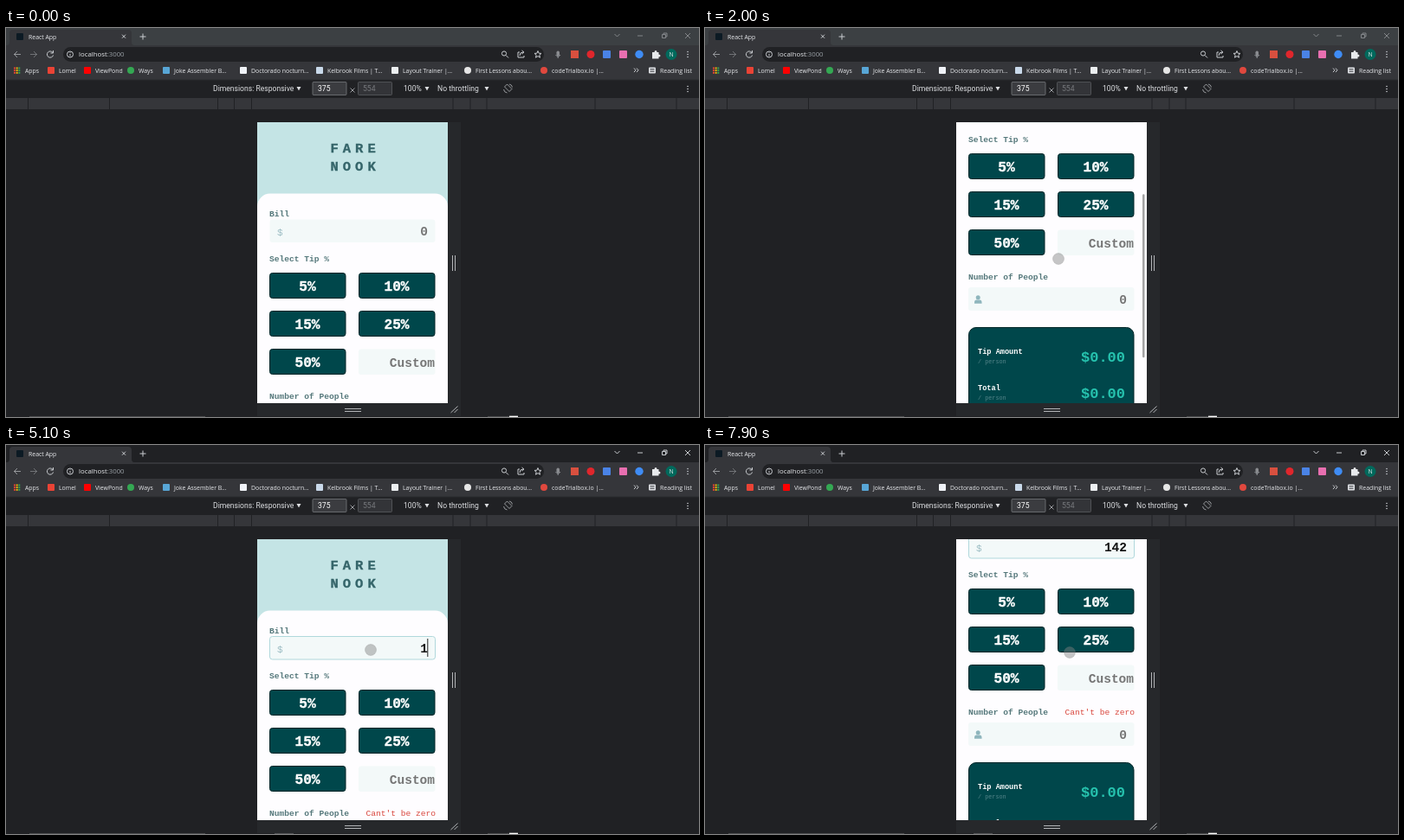
An HTML page that plays this animation: 800x450 px, repeating every 8000 ms.

```html
<!DOCTYPE html>
<html lang="en">
<head>
<meta charset="utf-8">
<title>Tip calculator</title>
<style>
html, body { margin: 0; width: 100%; height: 100%; overflow: hidden; background: #202124; }
svg { display: block; }
text { white-space: pre; }
.ui { font-family: "Open Sans", "Noto Sans", sans-serif; font-size: 6.9px; fill: #e8eaed; }
.dev { font-family: Roboto, "Liberation Sans", sans-serif; font-size: 8.6px; fill: #dcdee1; }
.page { font-family: "Liberation Mono", "DejaVu Sans Mono", monospace; font-weight: bold; }
.line { fill: none; stroke: #c9ccd0; stroke-width: 1; }
</style>
</head>
<body>
<svg id="stage" width="800" height="450" viewBox="0 0 800 450"></svg>
<script>
const stage = document.getElementById('stage');
const LOOP = 8000;

const rect = (x, y, w, h, fill, r = 0, extra = '') =>
  `<rect x="${x}" y="${y}" width="${w}" height="${h}" rx="${r}" fill="${fill}" ${extra}/>`;
const dot = (x, y, r, fill, extra = '') =>
  `<circle cx="${x}" cy="${y}" r="${r}" fill="${fill}" ${extra}/>`;
const path = (d, extra = '') => `<path class="line" d="${d}" ${extra}/>`;
const text = (x, y, s, extra = '') => `<text x="${x}" y="${y}" ${extra}>${s}</text>`;
const mono = (x, y, s, size, fill, anchor = 'start', extra = '') =>
  text(x, y, s, `font-size="${size}" fill="${fill}" text-anchor="${anchor}" ${extra}`);
const arrow = x => `<path d="M${x - 2.5} 68h5l-2.5 4.5z" fill="#dcdee1"/>`;
const dots = (x, y) => [-3, 0, 3].map(d => dot(x, y + d, .8, '#c9ccd0')).join('');

function browser() {
  const bar = '#35363a';
  let s = rect(0, 0, 800, 450, '#202124')
    + rect(0, 0, 800, 20, '#202124', 0, 'id="frame"') + rect(0, 20, 800, 40, bar)
    + `<path d="M1 20q3 0 3-4V6q0-4 4-4h133q4 0 4 4v10q0 4 3 4z" fill="${bar}"/>`
    + rect(12, 6, 8, 8, '#0c1a24', 1)
    + text(26, 12.5, 'React App')
    + path('M134 7.7l4 4m0-4l-4 4M154.500 10h7m-3.500-3.500v7')
    + `<g id="controls">${path('M702.500 7l3 3 3-3', 'stroke-width=".8"')}`
    + path('M729 9h6M757.500 7.500h4v4h-4zM759 7.500v-1.500h4v4h-1.500M784 6l6 6m0-6l-6 6') + '</g>'

    // address row
    + rect(66, 22, 555, 17, '#202124', 8.5)
    + path('M17 30.500H9.500m3.500-3.500l-3.500 3.500 3.500 3.500', 'opacity=".65"')
    + path('M28 30.500h7.500m-3.500-3.500l3.500 3.500-3.500 3.500', 'opacity=".4"')
    + path('M54 28.500a3.600 3.600 0 1 0 .5 3M54.500 26v3h-3', 'stroke-width="1.200"')
    + dot(74, 30.5, 3.5, 'none', 'class="line"') + path('M74 30v2.500M74 28.300v.8')
    + text(84, 33.3, 'localhost<tspan fill="#9aa0a6">:3000</tspan>', 'style="font-size:7.800px"')
    + dot(575, 29.5, 2.6, 'none', 'class="line"') + path('M577 31.500l3 3')
    + path('M593 28h-2v6h7v-2M593 32q0-4 4-4m-1.500-2l2.500 2-2.500 2', 'stroke-width=".9"')
    + path('M614 26.500l1.100 2.700 2.900.2-2.200 1.900.7 2.900-2.500-1.600-2.500 1.600.7-2.900-2.200-1.900 2.900-.2z', 'stroke-width=".8"')
    + rect(635.5, 26.5, 3.5, 6, '#8a8c90', 1.7) + path('M634.500 31q2.700 4 5.500 0M637.200 33v2', 'opacity=".6"')
    + rect(652, 26, 9, 9, '#d8503f') + dot(675, 30.5, 4.5, '#e0262c')
    + rect(689, 26, 9, 9, '#4a83e6', 1) + rect(708, 26, 9, 9, '#e86fb0', 1)
    + dot(731, 30.5, 4.7, '#3f8cf5')
    + '<path d="M746 28h2.500q0-2 1.500-2t1.500 2h2v2.500q2 0 2 1.500t-2 1.500v2h-7.500z" fill="#e8eaed"/>'
    + dot(768, 30.5, 6.5, '#00695c') + text(768, 33, 'N', 'text-anchor="middle"')
    + dots(787, 30.5);

  // bookmarks: icon x, icon colour, round, label
  const marks = [
    [52, '#ea4335', 0, 'Lomel'], [94, '#f00', 0, 'ViewPond'], [144, '#34a853', 1, 'Ways'],
    [185, '#58a6d6', 0, 'Joke Assembler B...'], [274, '#f0f3f8', 0, 'Doctorado nocturn...'],
    [362, '#c9d9ea', 0, 'Kelbrook Films | T...'], [449, '#eceff1', 0, 'Layout Trainer |...'],
    [533, '#e6e6e6', 1, 'First Lessons abou...'], [621, '#e0483e', 1, 'codeTrialbox.io |...']
  ];
  const hues = ['#ea4335', '#fbbc04', '#34a853', '#4285f4'];
  for (let i = 0; i < 9; i++)
    s += rect(9 + i % 3 * 2.7, 45.5 + (i / 3 | 0) * 2.7, 1.9, 1.9, hues[(i + (i / 3 | 0)) % 4]);
  s += text(22, 51.5, 'Apps');
  for (const [x, c, round, label] of marks)
    s += (round ? dot(x, 49, 4, c) : rect(x - 4, 45, 8, 8, c, 1)) + text(x + 9, 51.5, label);
  s += path('M725 46.500l2 2.300-2 2.300m3-4.600l2 2.300-2 2.300')
    + rect(742, 45.5, 8, 7, '#dfe1e5', 1) + path('M743.500 47.800h5m-5 2.400h5', 'style="stroke:#35363a"')
    + text(755, 51.5, 'Reading list');
  return `<g class="ui">${s}</g>`;
}

function devtools() {
  let s = rect(0, 59.5, 800, 1, '#2b2c2f')
    + text(239, 73, 'Dimensions: Responsive') + arrow(338)
    + rect(354, 62.5, 39, 15, '#3b3c40', 1, 'stroke="#77797d" stroke-width=".8"') + text(360, 73, '375', 'fill="#fff"')
    + path('M397.500 69.500l5 5m0-5l-5 5', 'stroke-width=".8" opacity=".7"')
    + rect(406.5, 62.5, 39, 15, '#333438', 1, 'stroke="#5b5d61" stroke-width=".8"') + text(412, 73, '554', 'style="fill:#77797d"')
    + text(459, 73, '100%') + arrow(486)
    + text(498, 73, 'No throttling') + arrow(555)
    + path('M575.500 68l3-3 5.500 5.500-3 3zM574.500 71q.5 3.500 4 4M581 65q3 .5 3.500 3.500', 'stroke-width=".8" opacity=".7"')
    + dots(787, 70.5)
    + rect(0, 81, 800, 13, '#35363a');
  for (const x of [25.5, 119.5, 244.5, 263.5, 283.5])
    s += path(`M${x} 81v13M${799.5 - x} 81v13`, 'style="stroke:#202124"');
  s += rect(290, 109, 235, 340, '#26282b')
    + path('M515.500 263v18m3-18v18M391 440.500h19m-19 3h19', 'style="stroke:#b4b6b9"')
    + path('M513.500 445l8-7.500m-4 7.500l4-4', 'style="stroke:#b4b6b9"')
    + rect(27, 449, 203, 1, '#4a4b4d') + rect(556, 449, 25, 1, '#47484a') + rect(581, 448.7, 10, 1.3, '#fff')
    + rect(310, 449, 22, 1, '#505154', 0, 'id="task"');
  return `<g class="dev">${s}</g>`;
}

function page() {
  const dark = '#00474b', label = '#55787b', field = '#f3f9f9', hint = '#757575', edge = 'stroke="#002427"';
  const heavy = c => `stroke="${c}" stroke-width=".35"`;
  const button = (x, y, s) =>
    rect(x + .5, y, 87.5, 29, dark, 3, edge) + mono(x + 44, y + 20.5, s, 16.1, '#fff', 'middle', heavy('#fff'));
  const amount = (y, name) => mono(315, y, name, 8.6, '#fff')
    + mono(315, y + 10.3, '/ person', 6.8, '#55858a', 'start', 'font-weight="normal"')
    + mono(485, y + 8.5, '$0.00', 17, '#26c2ae', 'end');
  const title = (y, s) => mono(374.5, y, s, 15.5, '#35656a', 'start', `letter-spacing="5" ${heavy('#35656a')}`);

  return rect(290, 100, 220, 600, '#c4e4e5') + title(144, 'FARE') + title(164.5, 'NOOK')
    + rect(290, 191.5, 220, 451.5, '#fefdff', 15)
    + mono(304, 217.5, 'Bill', 9.6, label)
    + rect(304.5, 221.5, 191, 26.5, field, 3, 'id="bill"')
    + mono(313, 239.5, '$', 11, '#9bbcc3', 'start', 'font-weight="normal"')
    + mono(487, 240, '0', 14.5, hint, 'end', 'id="value"')
    + rect(486.3, 224, 1, 21, '#222', 0, 'id="caret"')
    + mono(304, 270, 'Select Tip %', 9.6, label)
    + button(304, 283.5, '5%') + button(407, 283.5, '10%')
    + button(304, 327.5, '15%') + button(407, 327.5, '25%') + button(304, 371.5, '50%')
    + rect(407, 371.5, 88.5, 29.5, field, 3) + mono(495, 391.7, 'Custom', 14.5, hint, 'end')
    + mono(304, 429, 'Number of People', 9.6, label)
    + mono(496, 429, "Cant't be zero", 9.6, '#d9483f', 'end', 'id="error" font-weight="normal"')
    + rect(304, 438, 191.5, 27, field, 3)
    + dot(315.2, 449.7, 2.5, '#8fb6bd')
    + '<path d="M311 456.800v-1.300q0-3 2.500-3h3.500q2.500 0 2.500 3v1.300z" fill="#8fb6bd"/>'
    + mono(487, 457, '0', 14.5, hint, 'end')
    + rect(304.5, 484.5, 190.5, 143.5, dark, 8.5, edge)
    + amount(515.3, 'Tip Amount') + amount(557.3, 'Total')
    + rect(315, 589, 170, 26.5, '#07565b', 3)
    + mono(400, 606.3, 'RESET', 10.3, '#00393d', 'middle', 'letter-spacing=".7"');
}

stage.innerHTML = browser() + devtools()
  + `<svg class="page" x="290" y="109" width="220" height="325" viewBox="290 109 220 325">
      <g id="scroll">${page()}</g>
      ${rect(505, 112, 2.5, 189, '#8c8c8c', 1.2, 'id="thumb" fill-opacity=".8"')}
      ${dot(0, 0, 6.5, '#808080', 'id="cursor" fill-opacity=".45" stroke="#808080" stroke-opacity=".25"')}
    </svg>`;

const el = id => document.getElementById(id);
const show = (id, on) => el(id).setAttribute('opacity', +on);
const clamp = x => Math.max(0, Math.min(1, x));
const ease = x => x * x * (3 - 2 * x);

// start, end, distance
const scrolls = [[1600, 2280, 218], [2900, 3500, -218], [6840, 7440, 117]];
// start, end, x, y
const moves = [[1000, 1300, 408, 267], [3400, 3750, 421, 237], [6500, 6700, 421, 240]];
const FOCUS = 3800, FIRST_KEY = 4700;
const keys = [[FOCUS, ''], [FIRST_KEY, '1'], [5500, '14'], [5950, '142']];

function draw(t) {
  let y = 0, thumb = 0;
  for (const [a, b, d] of scrolls) {
    y += d * ease(clamp((t - a) / (b - a)));
    if (t > a) thumb = 1 - clamp((t - b - 150) / 250);
  }
  el('scroll').setAttribute('transform', `translate(0 ${-y})`);
  el('thumb').setAttribute('y', 112 + y * .581);
  show('thumb', thumb);

  let cx = 509, cy = 300;
  for (const [a, b, x, y2] of moves) {
    const k = ease(clamp((t - a) / (b - a)));
    cx += (x - cx) * k;
    cy += (y2 - cy) * k;
  }
  el('cursor').setAttribute('cx', cx);
  el('cursor').setAttribute('cy', cy);
  show('cursor', t >= moves[0][0]);

  const focused = t >= FOCUS;
  const [at, typed] = keys.filter(k => t >= k[0]).pop() || [0, ''];
  const value = el('value');
  value.textContent = typed || '0';
  value.setAttribute('fill', typed ? '#111' : '#757575');
  show('caret', focused && (t - at) % 1000 < 500);
  show('error', t >= FIRST_KEY);
  el('bill').setAttribute('stroke', focused ? '#b0d8dc' : 'none');
  el('frame').setAttribute('fill', focused ? '#202124' : '#3c4043');
  show('controls', focused ? 1 : .5);
  show('task', focused);
}

function tick() {
  draw(performance.now() % LOOP);
  requestAnimationFrame(tick);
}
tick();
</script>
</body>
</html>
```
